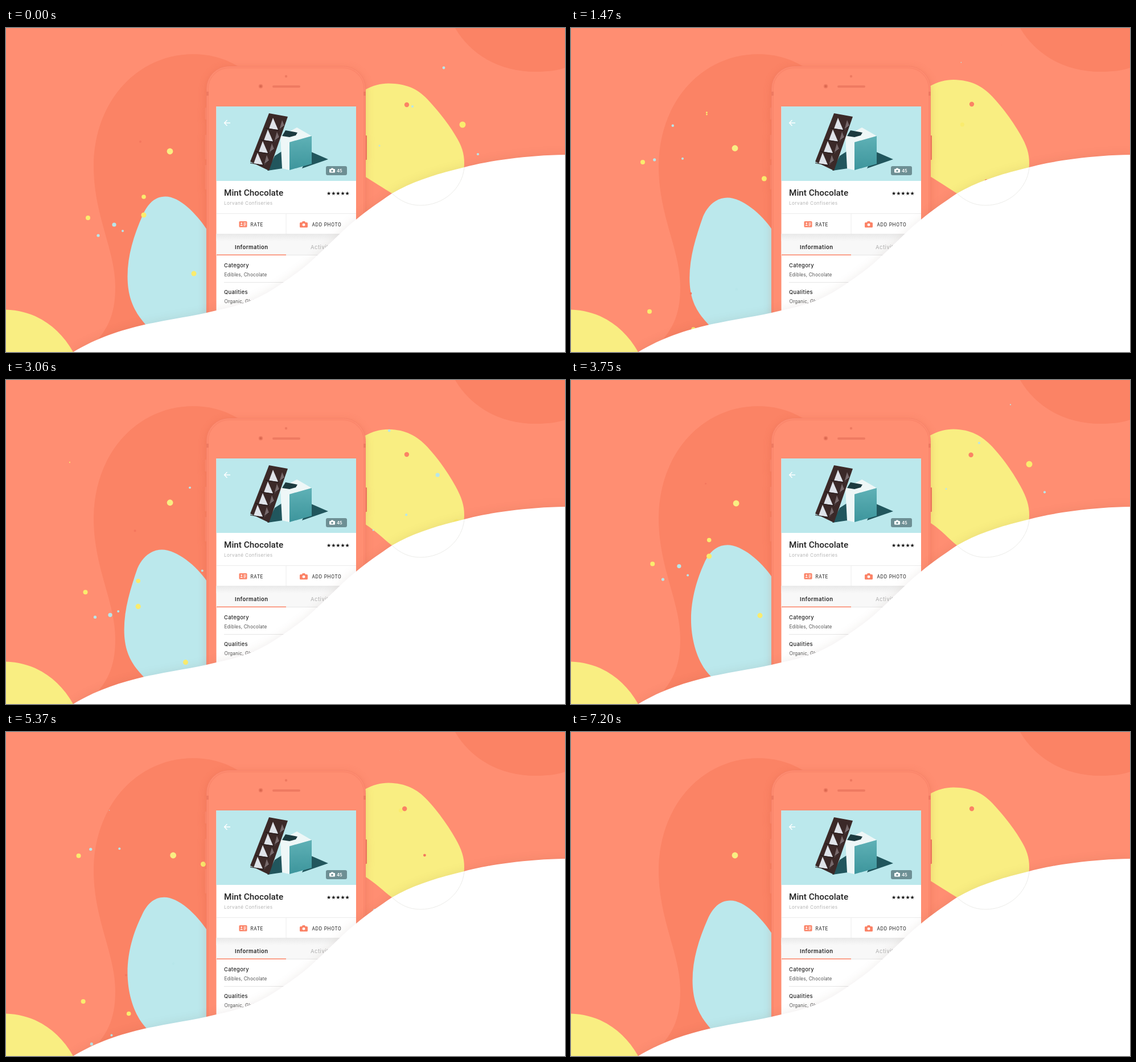
An HTML page that plays this animation: 982 by 570 pixels, repeating every 7230 ms.

```html
<!DOCTYPE html>
<html lang="en">
<head>
<meta charset="utf-8">
<title>Chocolate app</title>
<style>
html, body { margin: 0; width: 100%; height: 100%; overflow: hidden; background: #ff8e72; }
svg { display: block; }
text { font-family: Inter, sans-serif; fill: #222; }
.title { font: 500 15.3px Roboto, sans-serif; }
.maker { font-size: 8.2px; letter-spacing: .4px; fill: #b4b4b4; }
.button { font: 8.3px Roboto, sans-serif; letter-spacing: .7px; }
.tab { font-size: 9.5px; letter-spacing: .5px; }
.head { font-size: 9.3px; font-weight: 500; letter-spacing: .35px; }
.body { font-size: 8.3px; letter-spacing: .12px; fill: #555; }
.stars { font: 9.1px "DejaVu Sans", sans-serif; fill: #111; }
.badge { font-size: 7.6px; font-weight: 600; fill: #fff; }
.phone { filter: drop-shadow(0 3px 7px rgba(190, 60, 30, .18)); }
.wave { filter: drop-shadow(0 -4px 7px rgba(60, 30, 20, .06)); }
</style>
</head>
<body>
<svg width="982" height="570" viewBox="0 0 982 570">
  <defs>
    <linearGradient id="teal" x2="0" y2="1">
      <stop stop-color="#5fb1b6"/><stop offset="1" stop-color="#3d959c"/>
    </linearGradient>
    <linearGradient id="fade" x2="0" y2="1">
      <stop stop-color="#e9e9e9"/><stop offset="1" stop-color="#f8f8f8"/>
    </linearGradient>
    <path id="camera" d="M1.5 2H3.8L5 0H9L10.2 2H12.5Q14 2 14 3.5V9.5Q14 11 12.5 11H1.5Q0 11 0 9.5V3.5Q0 2 1.5 2Z"/>
  </defs>

  <rect width="982" height="570" fill="#ff8e72"/>
  <g fill="#fb8365">
    <path d="M163 546C186 518 192 490 192 455C192 390 154 330 154 244C154 130 230 46 329 46C362 46 388 55 412 70L500 300L420 560Z"/>
    <path d="M789 0C815 45 865 77 930 77C950 77 968 75 982 70V0Z"/>
  </g>
  <path d="M0 495.5C50 497 92 524 118 570H0Z" fill="#f9ee82"/>
  <path id="mint" fill="#bbe8ec"/>
  <path id="lemon" fill="#f9ee82"/>
  <g id="dots"></g>

  <g class="phone">
    <g fill="#f98468">
      <rect x="349.5" y="140" width="4" height="21" rx="1"/>
      <rect x="349.5" y="188" width="4" height="43" rx="1"/>
      <rect x="349.5" y="241" width="4" height="43" rx="1"/>
      <rect x="630" y="189" width="4" height="43" rx="1" fill="#e9755b"/>
    </g>
    <rect x="352.5" y="67.5" width="279" height="520" rx="39" fill="#ff8e72" stroke="#f6826a"/>
    <rect x="355" y="70" width="274" height="515" rx="37" fill="none" stroke="#fb876c" stroke-width="2"/>
  </g>
  <g fill="#ee7a61">
    <path d="M352 112h4v7h-4zM628 112h4v7h-4z"/>
    <rect x="468" y="101" width="49" height="4" rx="2"/>
    <circle cx="447.5" cy="102.5" r="3.7"/>
    <circle cx="492" cy="85" r="2.2"/>
  </g>
  <circle cx="447.5" cy="102.5" r="2" fill="#d9684f"/>

  <rect x="369.5" y="138" width="245.500" height="400" fill="#fff"/>
  <rect x="369.5" y="138" width="245.500" height="131" fill="#bbe8ec"/>
  <path d="M394 167H383.5M388.5 162L383.5 167L388.5 172" fill="none" stroke="#fff" stroke-width="1.4"/>

  <path d="M459 251L472 225L486 216V247ZM534 217L566 231L520 247Z" fill="#21565d"/>
  <path d="M482 191L511 175L537 190L498 201V250L485 247Z" fill="#eef7f7"/>
  <path d="M485 190L491 180L512 184L509 189L498 192Z" fill="#1c3a3f"/>
  <path d="M498 201L537 190V239L498 250Z" fill="url(#teal)"/>
  <path d="M462 150L495 156L462 251L429 235Z" fill="#3b2928"/>
  <g id="squares"></g>

  <rect x="562" y="243" width="37" height="16" rx="3" fill="#6d8f94"/>
  <use href="#camera" transform="translate(568 246.5) scale(.72)" fill="#fff"/>
  <circle cx="573" cy="251.2" r="1.7" fill="#6d8f94"/>
  <text class="badge" x="581" y="254">45</text>

  <text class="title" x="383" y="295">Mint Chocolate</text>
  <text class="maker" x="383" y="311">Lorvané Confiseries</text>
  <text class="stars" x="563" y="293.5">★★★★★</text>
  <path d="M370 326.5H615M492 326.5V362" stroke="#ececec"/>
  <g fill="#fb8367">
    <rect x="409.5" y="340" width="14" height="10.5" rx="1.5"/>
    <use href="#camera" x="516" y="340"/>
  </g>
  <g fill="#fff">
    <circle cx="523" cy="346.2" r="2.4"/>
    <circle cx="413.7" cy="343.6" r="1.3"/>
    <path d="M411.3 348q2.4-4 4.8 0zM417.5 342.5h4v1.2h-4zM417.5 345h4v1.2h-4zM417.5 347.3h3v1h-3z"/>
  </g>
  <text class="button" x="429.5" y="348.7">RATE</text>
  <text class="button" x="537.5" y="348.7">ADD PHOTO</text>

  <rect x="369.5" y="362" width="245.500" height="38" fill="#f8f8f8"/>
  <rect x="369.5" y="362" width="245.500" height="13" fill="url(#fade)"/>
  <path d="M370 399.5H615M383 447.5H615" stroke="#e6e6e6"/>
  <path d="M370 399.2H492" stroke="#fb8367" stroke-width="1.6"/>
  <text class="tab" x="402" y="389" font-weight="600">Information</text>
  <text class="tab" x="535" y="389" style="fill:#b0b0b0">Activity</text>
  <text class="head" x="383" y="421">Category</text>
  <text class="body" x="383.5" y="437">Edibles, Chocolate</text>
  <text class="head" x="383" y="468">Qualities</text>
  <text class="body" x="383.5" y="484">Organic, Gluten free</text>

  <path class="wave" fill="#fff" d="M118 570C160 545 200 532 245 521.5C290 512 328 507 365 498C388 493 408 488 428 480.5C450 472 470 460 488 447C510 432 530 417 548 399C575 374 592 355 615 337C635 320 656 306 678 291C718 268 760 256 805 245C850 233 915 224 982 223V590H118Z"/>
  <path d="M805 245C802 282 769 312 728 312C708 312 692 304 678 291" fill="none" stroke="#e9e9e6" stroke-width=".9"/>
</svg>
<script>
const LOOP = 7230, SCENE = 7200, CYCLE = SCENE / 2;
const YELLOW = '#faec6e', BLUE = '#b7e6ea', RED = '#f4775e';
const $ = id => document.getElementById(id);

function add(parent, tag, attrs) {
  const el = parent.appendChild(document.createElementNS('http://www.w3.org/2000/svg', tag));
  for (const k in attrs) el.setAttribute(k, attrs[k]);
  return el;
}
function place(el, x, y) {
  el.setAttribute('cx', x);
  el.setAttribute('cy', y);
}

// Four rows of moulded chocolate pieces.
for (let i = 0; i < 4; i++) {
  const row = add($('squares'), 'g', { transform: `translate(${-9 * i} ${20.5 * i})` });
  add(row, 'path', { d: 'M469 158L478 179L462 177Z', fill: '#dfe3e9' });
  add(row, 'path', { d: 'M485 162L489 172L480 180Z', fill: '#77696b' });
  add(row, 'path', { d: 'M456 176L478 180L489 172', fill: 'none', stroke: '#1e1415' });
}

// Each dot is set by its place when the cycle starts over and its rise in px per ms.
const dots = [];
function dot(fill, r, x, y, rise) {
  for (const shift of [-CYCLE, 0]) dots.push({ r, x, y, rise, shift, el: add($('dots'), 'circle', { fill }) });
}
dot(YELLOW, 4, 144, 334, .071);
dot(BLUE, 2.6, 162, 365, .095);
dot(BLUE, 3.6, 190, 346, .123);
dot(BLUE, 2, 205, 357, .091);
dot(YELLOW, 3.8, 242, 297, .103);
dot(YELLOW, 4.6, 242, 329, .127);
dot(YELLOW, 4.5, 330, 432, .118);
dot(RED, 2, 236, 200, .119);
dot(BLUE, 2.3, 338, 101, .162);
dot(BLUE, 2, 361, 259, .14);

dot(YELLOW, 5.5, 802, 170, .147);
dot(BLUE, 2.1, 829, 222, .165);
dot(BLUE, 3.6, 769, 70, .178);
dot(BLUE, 2.1, 714, 138, .182);
dot(BLUE, 2.6, 684, -2, .167);
dot(BLUE, 1.5, 656, 207, .104);
dot(YELLOW, 3.6, 730, -44, .094);
dot(RED, 1.3, 799, -367, .18);
dot(RED, 2.4, 772, -86, .16);

// Left dots sway and fan out, right dots lean steadily; both shrink to nothing near a ceiling.
function moveDot(d, t) {
  const u = t % CYCLE + d.shift, left = d.x < 491;
  const sway = 6 * (Math.cos(2 * Math.PI * u / 2400) - 1) - 2e-6 * u * u + (d.x - 165) * 1e-4 * u;
  const x = d.x + (left ? sway : .02 * u);
  const y = d.y - d.rise * u + 3e-6 * u * u;
  const size = (y - (left ? 125 : 20)) / 75;
  d.el.setAttribute('r', t < SCENE ? d.r * Math.max(0, Math.min(1, size)) : 0);
  place(d.el, x, y);
}

const bigYellow = add($('dots'), 'circle', { r: 5.4, fill: '#f9ee82' });
const bigRed = add($('dots'), 'circle', { r: 4.2, fill: '#fb8365' });

// Smooth swell from 0 to 1 and back between two points of the scene.
const bump = (p, from, to) => p > from && p < to ? Math.sin(Math.PI * (p - from) / (to - from)) ** 2 : 0;

function moveBlobs(p) {
  const lean = bump(p, 0, .65), rise = bump(p, .4, .85);
  const x = 280 - 7.5 * lean - 4.5 * rise, y = 296.5 + 3 * lean - 13 * rise;
  const left = 213.5 - 7.5 * lean, mid = 437 + 4 * lean - 31 * rise;
  const foot = 244.5 - 5 * lean + 4.5 * rise, right = 354 - 14 * rise;
  const shoulder = x - 40 - 4 * lean;
  $('mint').setAttribute('d', `M354 ${right + 2}C334 ${right - 28} ${x + 25} ${y} ${x} ${y}
    C${x - 18} ${y} ${shoulder + 9} ${y + 12} ${shoulder} ${y + 33}
    C${left + 11} ${mid - 72} ${left} ${mid - 37} ${left} ${mid}
    C${left} ${mid + 38} ${left + 12} 499 ${foot} 521L${foot + 10} 531H354Z`);

  const lift = -11 * Math.sin(Math.PI * p), side = lift * .7, tuck = -11 * bump(p, .15, 1);
  $('lemon').setAttribute('d', `M630 ${109 + lift}C645 ${101 + lift} 658 ${97.5 + lift} 672 ${97.5 + lift}
    C702 ${98 + lift} 722 ${106 + side} 740 ${125 + side}
    C762 ${149 + side} 777 ${168 + side / 2} 790 ${190 + side / 3}C800 206 805 220 805 238
    C805 278 770 312 728 312C708 312 692 304 678 291
    C662 ${281 + tuck * .3} 648 ${272 + tuck} 630 ${261 + tuck}Z`);

  const drift = bump(p, .4, 1);
  place(bigYellow, 288 + 6 * drift, 217 - 6 * bump(p, 0, .5));
  place(bigRed, 704 - 4 * drift, 135 - 4 * bump(p, .1, .75));
}

const start = performance.now();
function frame() {
  const t = Math.floor((performance.now() - start) % LOOP / 30) * 30;
  moveBlobs(t % SCENE / SCENE);
  for (const d of dots) moveDot(d, t);
  requestAnimationFrame(frame);
}
frame();
</script>
</body>
</html>
```
